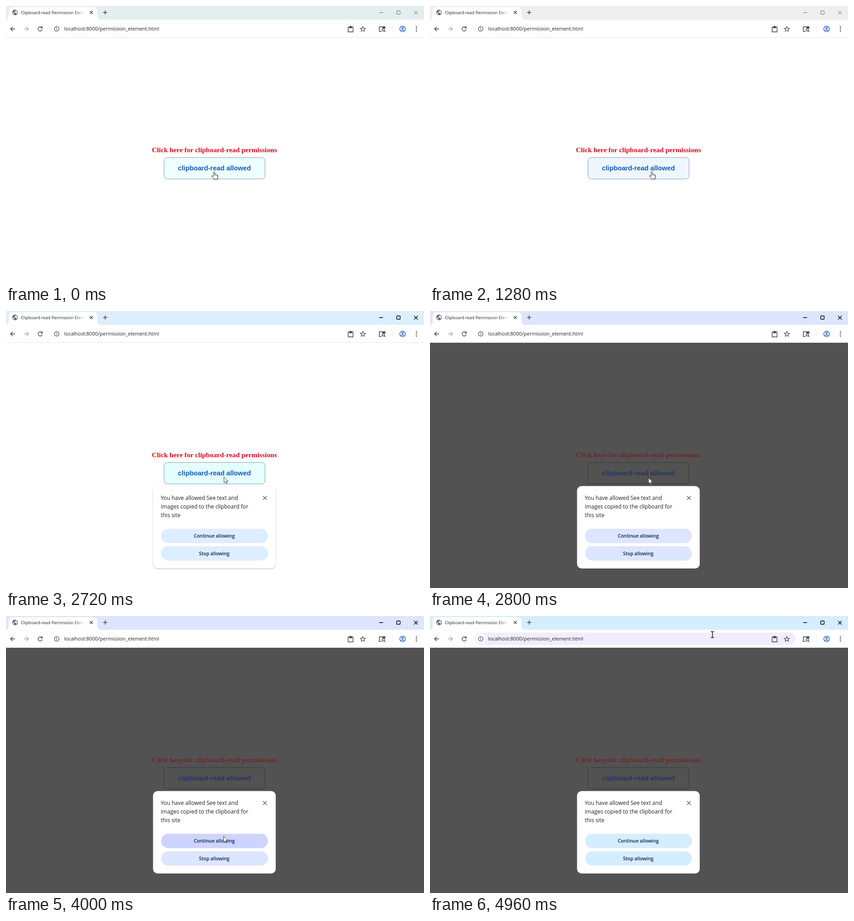
Write an HTML page that moves like this. It is 919x610 px and loops after 5040 ms.

```html
<!DOCTYPE html>
<html lang="en">
<head>
<meta charset="utf-8">
<title>Clipboard permission</title>
<style>
  html, body { margin: 0; width: 100%; height: 100%; overflow: hidden; background: #fff; }
  svg { display: block; width: 100%; height: 100%; }
  text { font-family: "Open Sans", "Noto Sans", sans-serif; fill: #1f2024; }
  .line { fill: none; stroke: #3c4043; stroke-width: 1.4; }
  .thin { stroke-width: 1.2; }
  .mid { text-anchor: middle; }
  #label { font: bold 15.43px "Liberation Serif", serif; }
  #btnText { font: bold 14.74px "Liberation Sans", sans-serif; }
  .msg { font-size: 12.07px; }
  .choice { font-size: 10.4px; font-weight: 600; fill: #071d49; }
</style>
</head>
<body>
<svg viewBox="0 0 919 610" preserveAspectRatio="none">
  <defs>
    <linearGradient id="fade" gradientUnits="userSpaceOnUse" x1="150" x2="174" y1="0" y2="0">
      <stop offset="0" stop-color="#fff" stop-opacity="0"/>
      <stop offset="1" stop-color="#fff"/>
    </linearGradient>
    <clipPath id="tabClip"><rect x="30" y="4" width="142" height="24"/></clipPath>
    <filter id="soft" x="-10%" y="-10%" width="120%" height="120%">
      <feDropShadow dx="0" dy="1" stdDeviation="1.2" flood-color="#50587a" flood-opacity=".5"/>
    </filter>
    <filter id="lift" x="-40%" y="-40%" width="200%" height="200%">
      <feDropShadow dx="1" dy="1" stdDeviation=".6" flood-opacity=".25"/>
    </filter>
  </defs>

  <!-- page -->
  <rect id="page" y="70" width="919" height="540"/>
  <text id="label" class="mid" x="458.2" y="322">Click here for clipboard-read permissions</text>
  <rect id="btn" x="347.5" y="333.7" width="222" height="47.2" rx="7"/>
  <text id="btnText" class="mid" x="458.3" y="362">clipboard-read allowed</text>

  <!-- tab strip -->
  <rect id="strip" width="919" height="30.5"/>
  <path fill="#fff" d="M-2 30.5Q6 30 6 22V12Q6 2.500 15.500 2.500H191.500Q201 2.500 201 12V22Q201 30 209 30.500Z"/>
  <circle cx="19.700" cy="14.200" r="6" fill="#565a5e"/>
  <path fill="#fff" d="M15 13.200L17.900 16V16.600Q17.900 17.800 19.100 17.800V18.900Q14 18 15 13.200ZM23.200 17.400Q22.900 16.600 21.500 16.600V14.800Q21.500 14.200 20.900 14.200H17.300V13H18.500Q19.100 13 19.100 12.400V11.200H20.300Q21.500 11.200 21.500 9.800Q26.400 12.400 23.200 17.400Z"/>
  <g clip-path="url(#tabClip)">
    <text x="32.700" y="18.200" font-size="9.350">Clipboard-read Permission Element</text>
    <rect x="150" y="4" width="24" height="24" fill="url(#fade)"/>
  </g>
  <path class="line" d="M184.300 11l6.400 6.400m0-6.400l-6.400 6.400M213.500 14.200h9m-4.500-4.500v9"/>
  <g id="winIcons" fill="none">
    <path d="M820.500 14.500h8.500M897.200 10.700l8 8m0-8l-8 8"/>
    <rect x="859" y="10.700" width="7.600" height="7.600" rx="1"/>
  </g>

  <!-- toolbar -->
  <rect y="30.500" width="919" height="39.500" fill="#fff"/>
  <path d="M0 69.500H919" stroke="#e4e6e9"/>
  <g id="omni">
    <rect x="97.500" y="36.500" width="706.500" height="27.500" rx="13.700" fill="#f0eefd"/>
    <circle cx="111.500" cy="50.300" r="11" fill="#fff"/>
  </g>
  <path class="line" d="M20 50.500H10.300m4.600-4.800l-4.800 4.800 4.800 4.800"/>
  <path class="line" style="stroke:#a4a8ad" d="M39.500 50.500h9.700m-4.600-4.800l4.800 4.800-4.800 4.800"/>
  <path class="line" d="M79 47.700a4.700 4.700 0 1 0 .7 4.100M79.700 45v3.600h-3.600"/>
  <circle class="line thin" cx="111.500" cy="50.400" r="5"/>
  <path class="line thin" d="M111.500 49.700v3.400m0-5.500v1.300"/>
  <text x="127.800" y="54.200" font-size="11">localhost:8000/permission_element.html</text>
  <path class="line" d="M752.300 46.200h10.700v10.800h-10.700z"/>
  <path fill="#3c4043" d="M754.500 45h1.700a1.500 1.500 0 0 1 3 0h1.600v3.700h-6.300z"/>
  <path id="star" class="line thin"/>
  <path class="line" d="M826 56h-5.300V45.700h12.600v4"/>
  <path fill="#3c4043" d="M827.500 45h6.500v4h-6.500z"/>
  <circle class="line" cx="829.600" cy="52.600" r="2.500"/>
  <path class="line" d="M831.400 54.400l2.600 2.600"/>
  <path d="M849.500 44v12.500" stroke="#e3e6ee"/>
  <g fill="none" stroke="#0b50b8" stroke-width="1.300">
    <circle cx="872" cy="50.500" r="6.200"/>
    <circle cx="872" cy="48.600" r="2"/>
    <path d="M867.600 54.700q4.400-3.600 8.800 0"/>
  </g>
  <g fill="#3c4043">
    <circle cx="902.300" cy="46" r="1.350"/><circle cx="902.300" cy="50.500" r="1.350"/><circle cx="902.300" cy="55" r="1.350"/>
  </g>

  <!-- permission prompt -->
  <g id="prompt">
    <rect x="323.300" y="385.500" width="269.700" height="181.500" rx="10" fill="#fff" filter="url(#soft)"/>
    <text class="msg" x="340.200" y="416.300">You have allowed See text and</text>
    <text class="msg" x="340.200" y="434.900">images copied to the clipboard for</text>
    <text class="msg" x="340.200" y="453.500">this site</text>
    <path class="line thin" d="M565 407.700l8.200 8.200m0-8.200l-8.200 8.200"/>
    <rect id="keep" x="340.800" y="479.500" width="235.200" height="31.700" rx="15.850"/>
    <rect id="stop" x="340.800" y="518" width="235.200" height="31.700" rx="15.850"/>
    <text class="choice mid" x="458" y="499.400">Continue allowing</text>
    <text class="choice mid" x="457.800" y="538.200">Stop allowing</text>
  </g>

  <!-- pointers, each with its hot spot at 0,0 -->
  <g id="hand" filter="url(#lift)">
    <path fill="#fff" stroke="#24262b" stroke-width=".9" stroke-linejoin="round"
      d="M-1.400 1.200Q0-.6 1.300 1.200V6.200Q2.800 5.300 3.700 6.700Q5.200 6 6 7.400Q7.800 7 8 8.800V12.500Q8 14.200 6.800 15.500V17H-.6V15.800L-5 10.700Q-5.200 8.700-3.300 9.300L-1.400 11Z"/>
    <path d="M1.300 6.500v3m2.500-2.600v2.800M6.100 7.800v2.300" stroke="#24262b" stroke-width=".7"/>
  </g>
  <path id="arrow" fill="#fff" stroke="#24262b" stroke-width=".9" stroke-linejoin="round"
    d="M.4.300V13L3.200 10.500 5.300 15.200 7.400 14.300 5.400 9.700H9.300Z"/>
  <path id="beam" fill="none" stroke="#000" stroke-width="1.300" d="M-3.500-6.500H-1L0-6 1-6.500H3.500M0-6V6M-3.500 6.500H-1L0 6 1 6.500H3.500"/>
</svg>
<script>
const LOOP = 5040, STEP = 80, FOCUS = 2560, PROMPT = 2720, DIM = 2800;
const $ = id => document.getElementById(id);
const set = (id, attrs) => { for (const k in attrs) $(id).setAttribute(k, attrs[k]); };
const show = (id, on) => set(id, { visibility: on ? 'visible' : 'hidden' });

// pointer path: time, x, y
const path = [
  [0, 457.5, 364.5], [640, 457.5, 364.5], [720, 474, 364.5], [800, 491.5, 364.5],
  [1120, 490, 364], [1280, 487.5, 364], [2080, 478.8, 365], [2720, 478.8, 365],
  [2800, 480, 367], [3280, 480, 369], [3760, 478, 485], [4160, 478, 485],
  [4720, 621, 41], [LOOP, 621, 41]
];

function pointer(t) {
  const i = path.findIndex(p => p[0] > t);
  const [t0, x0, y0] = path[i - 1], [t1, x1, y1] = path[i];
  const u = (t - t0) / (t1 - t0), e = u * u * (3 - 2 * u);
  return [x0 + (x1 - x0) * e, y0 + (y1 - y0) * e];
}

$('star').setAttribute('d', 'M' + Array.from({ length: 10 }, (_, i) => {
  const r = i % 2 ? 2.6 : 5.9, a = (i / 5 - 0.5) * Math.PI;
  return `${784.5 + r * Math.cos(a)} ${51 + r * Math.sin(a)}`;
}).join('L') + 'Z');

function stripColor(t) {
  if (t < 1120) return '#e4eeee';
  if (t < FOCUS) return '#eeeeee';
  if (t < DIM) return '#ddeeff';
  return t < 4480 ? '#dde5ff' : '#d5eeff';
}

function draw(t) {
  const dim = t >= DIM, active = t >= FOCUS, prompt = t >= PROMPT;
  const [x, y] = pointer(t);
  const typing = y < 64, onKeep = y > 479.5 && y < 511;
  const tint = stripColor(t);

  set('strip', { fill: tint });
  set('winIcons', { stroke: active ? '#000' : '#666', 'stroke-width': active ? 1.4 : 1 });
  set('page', { fill: dim ? '#525252' : '#fff' });
  $('label').style.fill = dim ? '#71252b' : '#dc0a1c';
  $('btnText').style.fill = dim ? '#27345f' : '#0f5cb8';
  set('btn', {
    fill: dim ? '#525252' : prompt ? '#e5ffff' : t < 1120 ? '#eeffff' : '#eef7ff',
    stroke: dim ? '#363840' : '#8e96b2'
  });
  set('keep', { fill: onKeep ? '#cdd5ff' : tint });
  set('stop', { fill: tint });
  show('prompt', prompt);
  show('omni', typing);

  const kind = typing ? 'beam' : prompt ? 'arrow' : 'hand';
  for (const id of ['hand', 'arrow', 'beam']) show(id, id === kind);
  set(kind, { transform: `translate(${x} ${y})` });
}

const start = performance.now();
function tick() {
  const t = (performance.now() - start) % LOOP;
  draw(Math.floor(t / STEP) * STEP);
  requestAnimationFrame(tick);
}
tick();
</script>
</body>
</html>
```
